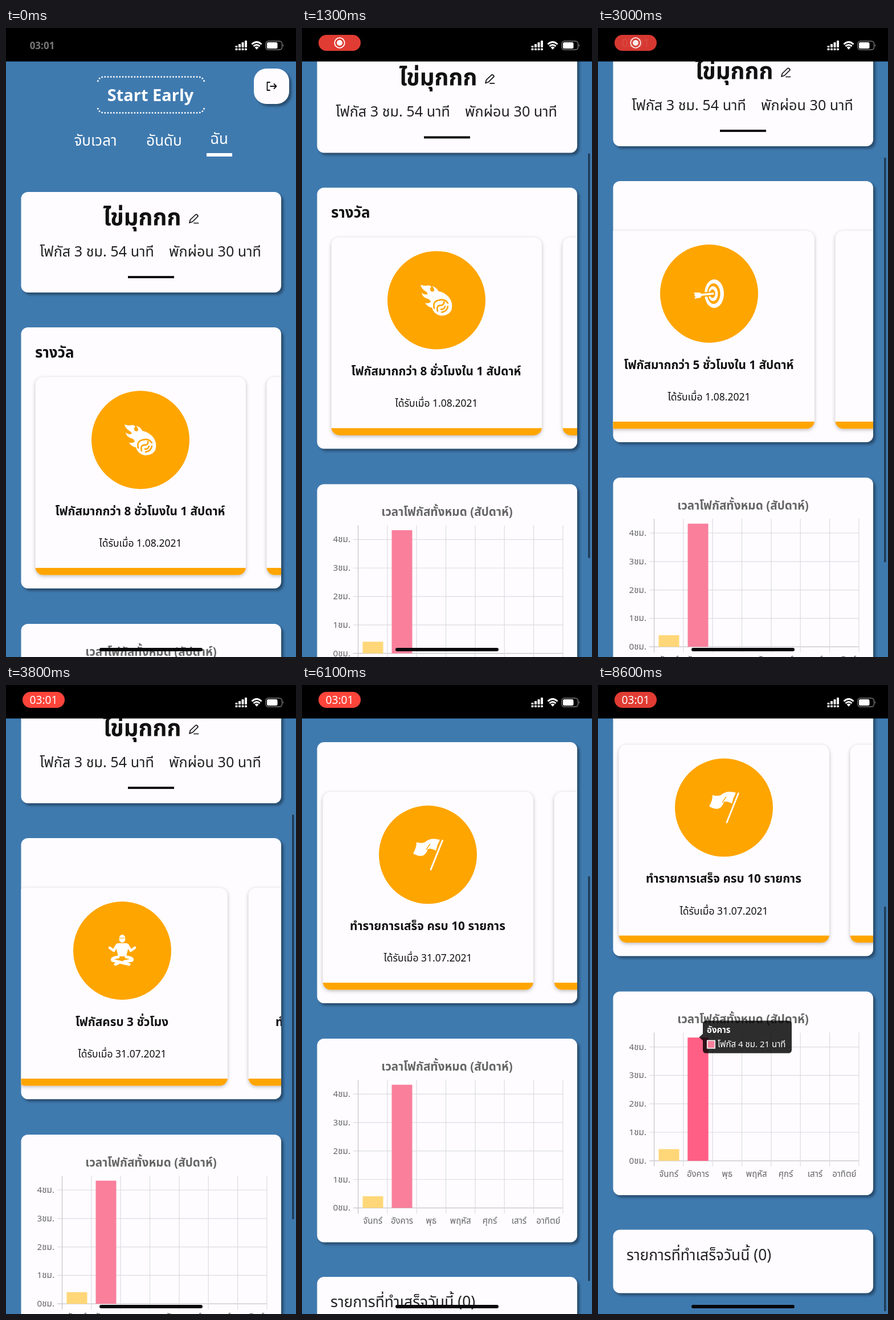
Recreate the animation shown at these times as an HTML page. Size 509 by 1101 pixels, loop 8.7 s.

```html
<!DOCTYPE html>
<html lang="th">
<head>
<meta charset="utf-8">
<style>
html, body { margin: 0; width: 100%; height: 100%; overflow: hidden; background: #3f7aaf; }
svg { display: block; width: 509px; height: 1101px; font-family: "Noto Sans Thai", "Noto Sans", sans-serif; }
.card { fill: #fefcff; filter: drop-shadow(4px 4px 2px rgba(0,0,0,.38)); }
.award { fill: #fefcff; filter: drop-shadow(0 2px 3px rgba(0,0,0,.26)); }
.mid { text-anchor: middle; }
.end { text-anchor: end; }
.bold { font-weight: 700; }
.light { font-weight: 300; }
</style>
</head>
<body>
<svg viewBox="0 0 509 1101">
  <defs>
    <clipPath id="panel"><rect x="26.5" y="524" width="456.5" height="457" rx="12"/></clipPath>
    <clipPath id="tile"><rect x="51.5" y="611" width="369.5" height="346.5" rx="14"/></clipPath>
  </defs>
  <rect width="509" height="1101" fill="#3f7aaf"/>
  <g id="page"></g>
  <rect id="thumb" x="502" width="3.6" height="709" rx="1.8" fill="#203d58"/>
  <rect width="509" height="58.6"/>
  <g id="status"></g>
  <rect x="164" y="1085" width="181" height="6" rx="3" fill="#08080a"/>
</svg>
<script>
const $ = id => document.getElementById(id);
const text = (s, x, y, size, cls = '', fill = '#111') =>
  `<text x="${x}" y="${y}" font-size="${size}" class="${cls}" fill="${fill}">${s}</text>`;
const rect = (x, y, w, h, fill, rx = 0) =>
  `<rect x="${x}" y="${y}" width="${w}" height="${h}" fill="${fill}" rx="${rx}"/>`;
const card = (y, h) => `<rect class="card" x="26.5" y="${y}" width="456.5" height="${h}" rx="12"/>`;
const line = (d, stroke, width, extra = '') =>
  `<path d="${d}" fill="none" stroke="${stroke}" stroke-width="${width}" ${extra}/>`;
const ROUND = 'stroke-linecap="round" stroke-linejoin="round"';

// Icons are centred on 0,0
const fireball = `
  <path fill="#fff" d="M-28-27Q-20-24-15-26Q-10-26-9-23Q-13-21-10-16Q-4-13-4-19Q-5-22-8-25Q1-22 3-16Q14-14 22-5Q30 5 26 18Q20 28 7 27Q-5 24-8 13Q-15 12-20 5Q-13 6-10 3Q-11-2-17-3Q-25-6-26-13Q-20-8-15-11Q-17-15-21-17Q-26-20-28-27Z"/>
  <path fill="none" stroke="#ffa500" stroke-width="2.6" stroke-linecap="round" d="M-4 14Q-7 2 4 0Q14-3 20 5M2 19Q-1 8 9 9Q14 7 13 3M9 21Q18 20 20 11M8 16Q13 17 15 11"/>`;
const target = `
  <ellipse cx="9" cy="0" rx="17" ry="25" fill="#fff"/>
  <ellipse cx="8" cy="0" rx="11.5" ry="18" fill="#ffa500"/>
  <ellipse cx="7" cy="0" rx="8.5" ry="13" fill="#fff"/>
  <ellipse cx="6" cy="0" rx="4.8" ry="7.5" fill="#ffa500"/>
  ${line('M-24 3L7 0', '#ffa500', 8)}${line('M-24 3L7 0', '#fff', 3.6, ROUND)}
  <path fill="#fff" d="M-27-2L-16-2L-12 2L-15 7L-26 9L-23 4Z"/>`;
const yogi = `
  <ellipse cx="0" cy="-21" rx="5.5" ry="7" fill="#fff"/>
  ${line('M-5-22H5', '#ffa500', 1.2)}
  <path fill="#fff" d="M-8-13H8L11-6L7 10H-7L-11-6Z"/>
  ${line('M-9-10L-15 0L-22-5M9-10L15 0L22-5', '#fff', 4.6, ROUND)}
  ${line('M-7 11Q-20 13-17 17L12 24M7 11Q20 13 17 17L4 19M-4 20L-12 24', '#fff', 5, ROUND)}`;
const flag = `
  <path fill="#fff" d="M-20-22Q-12-19-5-22Q5-31 21-26Q16-17 14-7Q6-12 0-10Q-3 0-10 2Q-17 3-26-2Q-20-12-20-22Z"/>
  ${line('M-3-9L4-19', '#ffa500', 1.4)}
  ${line('M25.5-25L5 26', '#fff', 2.8, ROUND)}`;

const award = (i, icon, title, date) => `<g transform="translate(${i * 406})">
  <rect class="award" x="51.5" y="611" width="369.5" height="346.5" rx="14"/>
  <g clip-path="url(#tile)">${rect(51, 945, 370, 13, '#ffa500')}</g>
  <circle cx="236" cy="721" r="86" fill="#ffa500"/>
  <g transform="translate(236 721)">${icon}</g>
  ${text(title, 235.5, 852.5, 20.8, 'mid bold')}
  ${text(date && 'ได้รับเมื่อ ' + date, 236, 908, 17.5, 'mid')}</g>`;

const header = `
  ${line('M161 94Q163 85.5 173 85.5H336Q346 85.5 348 94M161 140Q163 148.5 173 148.5H336Q346 148.5 348 140', '#fff', 2.6, 'stroke-dasharray="2.6 2.6"')}
  ${text('Start Early', 253.5, 128, 29, 'mid bold', '#fff')}
  <rect class="card" x="435" y="71" width="62" height="62" rx="22"/>
  ${line('M463 95H458.5V109H463M464 102H474M470.5 98L474.5 102L470.5 106', '#111', 1.8, ROUND)}
  ${text('จับเวลา', 157, 205.5, 26, 'mid light', '#fff')}
  ${text('อันดับ', 277.5, 205.5, 26, 'mid light', '#fff')}
  ${text('ฉัน', 374, 203, 26, 'mid light', '#fff')}
  ${rect(352, 219, 45, 6, '#fff')}`;

const profile = card(287, 176) + `
  ${text('ไข่มุกกก', 239, 345, 40, 'mid bold')}
  ${line('M322 341L323.5 335.5L333 326.5Q336 326 337 329.5L327.5 339ZM330 341.5H337.5', '#111', 1.7, ROUND)}
  ${text('โฟกัส 3 ชม. 54 นาที', 159.5, 400, 25.2, 'mid light', '#222')}
  ${text('พักผ่อน 30 นาที', 367, 400, 25.2, 'mid light', '#222')}
  ${rect(214, 434, 81, 4, '#111')}`;

const awards = card(524, 457) + `<g clip-path="url(#panel)"><g id="strip">
  ${text('รางวัล', 51, 576.5, 26, 'bold')}
  ${award(0, fireball, 'โฟกัสมากกว่า 8 ชั่วโมงใน 1 สัปดาห์', '1.08.2021')}
  ${award(1, target, 'โฟกัสมากกว่า 5 ชั่วโมงใน 1 สัปดาห์', '1.08.2021')}
  ${award(2, yogi, 'โฟกัสครบ 3 ชั่วโมง', '31.07.2021')}
  ${award(3, flag, 'ทำรายการเสร็จ ครบ 10 รายการ', '31.07.2021')}
  ${award(4, '', '', '')}</g></g>`;

const days = ['จันทร์', 'อังคาร', 'พุธ', 'พฤหัส', 'ศุกร์', 'เสาร์', 'อาทิตย์'];
const hourY = h => 1339.2 - h * 49.8;
const dayX = i => 98.5 + i * 51.35;
let grid = '';
for (let h = 0; h < 5; h++)
  grid += line(`M90 ${hourY(h)}H458`, h ? '#dcdce0' : '#c4c4c8', 1.2) +
    text(h + 'ชม.', 85, hourY(h) + 5, 15.2, 'end', '#666');
for (let i = 0; i < 8; i++)
  grid += line(`M${dayX(i)} 1115V1349`, i ? '#dcdce0' : '#c4c4c8', 1.2);
days.forEach((d, i) => grid += text(d, dayX(i + .5), 1367, 15, 'mid', '#666'));

const chart = card(1043, 356.5) + text('เวลาโฟกัสทั้งหมด (สัปดาห์)', 254.5, 1098.5, 20.7, 'mid bold', '#666') + grid +
  rect(106.5, 1318.8, 36, 20.4, '#ffd778') + rect(157.5, 1123.6, 36, 215.6, '#f97f9b') + `
  <g id="tip">${rect(157.5, 1123.6, 36, 215.6, '#ff5f85')}
    <path fill-opacity=".82" d="M190 1094H334Q340 1094 340 1100V1145Q340 1151 334 1151H190Q184 1151 184 1145V1129L177.5 1123L184 1117V1100Q184 1094 190 1094Z"/>
    ${text('อังคาร', 191, 1115, 15, 'bold', '#fff')}
    ${rect(191, 1128, 15, 15, '#fff')}${rect(192.5, 1129.5, 12, 12, '#f97f9b')}
    ${text('โฟกัส 4 ชม. 21 นาที', 210, 1140, 15, '', '#fff')}
  </g>`;

const todo = card(1460, 111) + text('รายการที่ทำเสร็จวันนี้ (0)', 50, 1513, 26.4, 'light', '#222');

$('page').innerHTML = header + profile + awards + chart + todo;

const bars = [0, 1, 2, 3].map(i =>
  rect(402.5 + i * 5.5, 31 - i * 3, 4, 3 + i * 3, '#fff', 1) + rect(402.5 + i * 5.5, 35.5, 4, 3.5, '#fff', 1)).join('');
$('status').innerHTML = `
  <g id="idle">${text('03:01', 63.5, 37, 17, 'mid bold', '#777')}</g>
  <g id="pill">
    <rect id="red" x="29" y="12" width="74" height="28" rx="14"/>
    <g id="rec"><circle cx="66" cy="26" r="8.8" fill="none" stroke="#fff" stroke-width="1.8"/><circle cx="66" cy="26" r="5" fill="#fff"/></g>
    <g id="clock">${text('03:01', 66, 33, 19.2, 'mid', '#fff')}</g>
  </g>
  ${bars}
  ${line('M431.5 28.5Q440 20.5 448.5 28.5M434.5 32Q440 27 445.5 32', '#fff', 3)}
  <path d="M436.5 34Q440 31 443.5 34L440 37.8Z" fill="#fff"/>
  <rect x="456" y="23" width="28.5" height="15" rx="4.5" fill="none" stroke="#777" stroke-width="1.4"/>
  ${rect(458, 25, 18.5, 11, '#fff', 2.5)}
  <path d="M486 28Q488.5 30.5 486 33Z" fill="#777"/>`;

const ramp = (t, start, length) => Math.min(1, Math.max(0, (t - start) / length));
const glide = (t, start, length) => 1 - (1 - ramp(t, start, length)) ** 3;
const show = (id, v) => $(id).setAttribute('opacity', v);

function draw(now) {
  const t = Math.floor(now % 8700 / 100) * 100;
  const y = 256 * glide(t, 500, 1240) + 250.4 * glide(t, 5800, 970);
  const x = 447 * glide(t, 2100, 850) + 397 * glide(t, 3200, 600) + 389 * glide(t, 5000, 680);
  $('page').setAttribute('transform', `translate(0 ${-y})`);
  $('strip').setAttribute('transform', `translate(${-x})`);
  $('thumb').setAttribute('y', 62 + y * .643);
  show('thumb', ramp(t, 400, 200));
  show('idle', 1 - ramp(t, 0, 300));
  show('pill', ramp(t, 200, 400));
  const swap = ramp(t, 2950, 500);
  show('rec', 1 - swap);
  show('clock', swap);
  const glow = .5 + .5 * Math.cos((t / 2000 - .975) * 2 * Math.PI);
  $('red').setAttribute('fill', `rgb(${214 + 41 * glow},${56 + 13 * glow},${49 + 9 * glow})`);
  show('tip', ramp(t, 7700, 300));
  requestAnimationFrame(() => draw(performance.now()));
}
draw(0);
</script>
</body>
</html>
```
